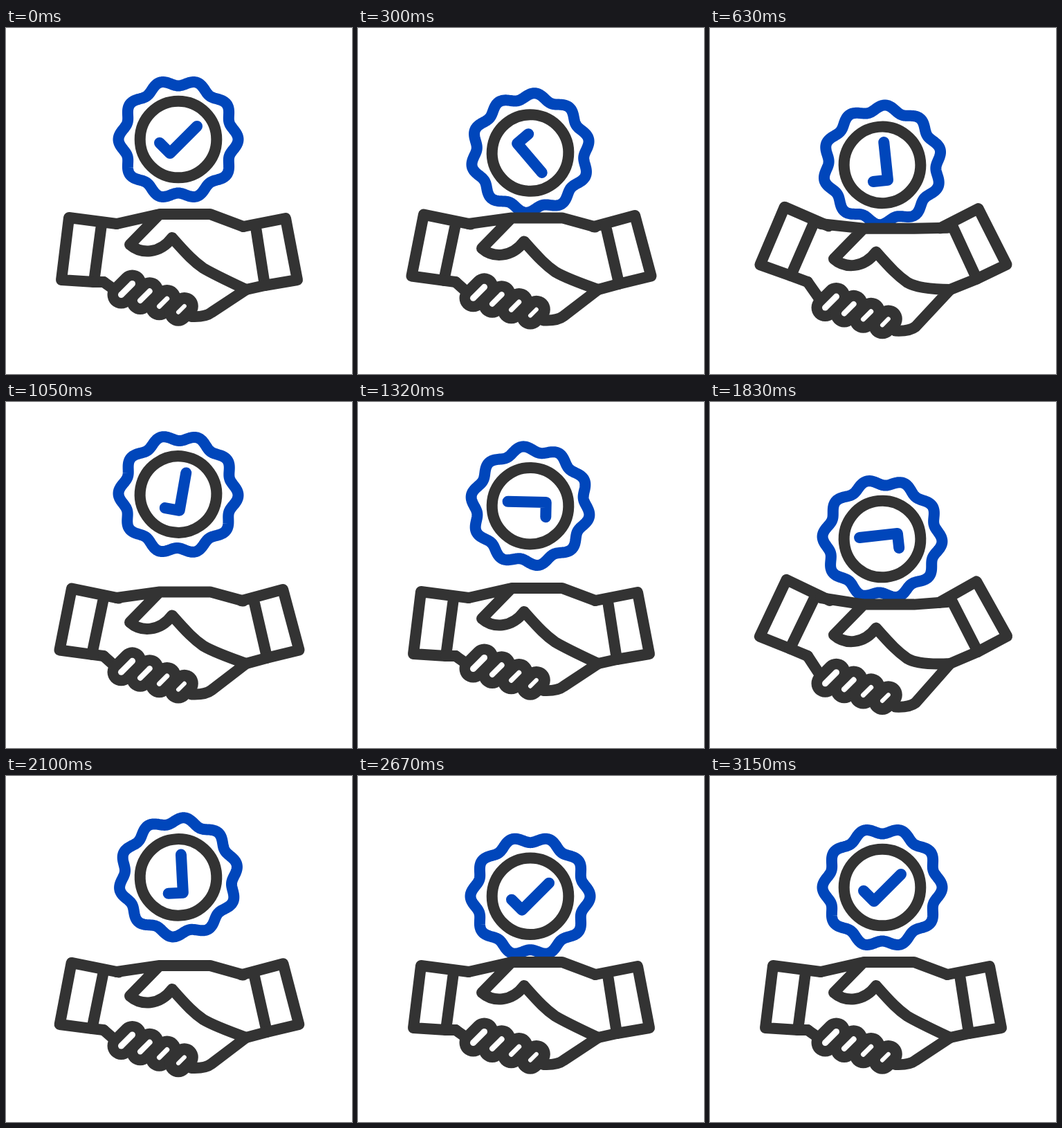
Animation, 500 px wide and 500 px high, one loop 3600 ms. Source, as an HTML page with a canvas:

```html
<!DOCTYPE html>
<html>
<head>
<meta charset="utf-8">
<style>
html, body { margin: 0; width: 100%; height: 100%; overflow: hidden; background: #fff; }
canvas { display: block; width: 500px; height: 500px; }
</style>
</head>
<body>
<canvas id="stage" width="500" height="500"></canvas>
<script>
const ctx = document.getElementById('stage').getContext('2d');
const LOOP = 3600, STEP = 30, DARK = '#333', BLUE = '#0046bb', DEG = Math.PI / 180;

// Turning points of the bouncing badge, and its angle along the way: [time, value]
const HEIGHT = [[0, 161], [590, 199], [1110, 131], [1740, 205], [2178, 141], [2700, 174], [3150, 161]];
const SPIN = [[0, 0], [630, 309], [1050, 685], [1560, 1149], [2100, 1392], [2700, 1440]];
// Time of each hit and how long the hands take to recover
const HITS = [[590, 690], [1740, 500]];

const HANDS = `M160 283L222 269L295 269L343 287M141 367L165 384M347 378L297 411Q288 418 268 417
  M222 269L179 313C195 327 222 327 240 303C262 328 272 338 285 347C300 356 330 370 347 378`;
const LEFT_CUFF = new Path2D('M160 283L91 274L80 364L127 367L138 284');
const RIGHT_CUFF = new Path2D('M343 287L404 275L421 364L374 372L361 288');

const badge = new Path2D();
for (let a = 0; a < 360; a++) {
  const r = 82 + 4.5 * Math.cos(10 * a * DEG);
  badge.lineTo(r * Math.cos(a * DEG), r * Math.sin(a * DEG));
}
badge.closePath();
const ring = new Path2D();
ring.arc(0, 0, 55.3, 0, 7);
const tick = new Path2D('M-27 5L-12 20L27 -19');

const clamp = v => Math.min(1, Math.max(0, v));

// Cubic through the keys; slope(i) gives the speed at key i
function curve(keys, t, slope) {
  const last = keys.length - 1;
  if (t >= keys[last][0]) return keys[last][1];
  const i = keys.findIndex(k => k[0] > t);
  const [t0, v0] = keys[i - 1], [t1, v1] = keys[i];
  const d = t1 - t0, s = (t - t0) / d, u = 1 - s;
  return v0 + (v1 - v0) * s * s * (3 - 2 * s) + d * s * u * (slope(i - 1) * u - slope(i) * s);
}

const height = t => curve(HEIGHT, t, () => 0);

const spin = t => curve(SPIN, t, i => {
  const a = SPIN[i - 1], b = SPIN[i + 1];
  return a && b ? (b[1] - a[1]) / (b[0] - a[0]) : 0;
});

// 0 = hands at rest, 1 = pushed down by the badge
function press(t) {
  const contact = time => Math.max(0, (height(time) - 174) / 24);
  const recoil = HITS.map(([hit, rest]) => {
    const s = clamp((t - hit) / rest);
    return t < hit ? 0 : contact(hit) * (1 - s * s * (3 - 2 * s));
  });
  return Math.max(contact(t), ...recoil);
}

// The wrists stay in place while everything between them sinks
function sag(path, q) {
  return new Path2D(path.replace(/([\d.]+) ([\d.]+)/g, (_, x, y) =>
    `${x} ${+y + 20 * q * clamp(Math.min((x - 160) / 6, (347 - x) / 45))}`));
}

function stroke(path, color, width = 16) {
  ctx.strokeStyle = color;
  ctx.lineWidth = width;
  ctx.stroke(path);
}

function turned(x, y, angle, paint) {
  ctx.save();
  ctx.translate(x, y);
  ctx.rotate(angle * DEG);
  paint();
  ctx.restore();
}

function cuff(path, x, y, angle) {
  turned(x, y, angle, () => {
    ctx.translate(-x, -y);
    stroke(path, DARK);
  });
  // Lower edge from the turned cuff to the fixed wrist
  const side = Math.sign(angle || 1);
}

function drawHands(q) {
  const tilt = 15.5 * q;
  cuff(LEFT_CUFF, 154, 326, tilt);
  cuff(RIGHT_CUFF, 346, 326, -tilt);
  const c = Math.cos(tilt * DEG), s = Math.sin(tilt * DEG);
  const hem = (x, y, dx, dy, dir, wrist) =>
    stroke(new Path2D(`M${x + dx * c - dir * dy * s} ${y + dir * dx * s + dy * c}L${wrist}`), DARK);
  hem(154, 326, -27, 41, 1, '141 367');
  hem(346, 326, 28, 46, -1, '347 378');
  stroke(sag(HANDS, q), DARK);

  const slots = [0, 1, 2, 3].map(i => {
    const x = 174.5 + 26.3 * i, y = 377.5 + 9.6 * i, half = 8 - 1.2 * i;
    return sag(`M${x - half} ${y + half}L${x + half} ${y - half}`, q * .9);
  });
  slots.forEach(p => stroke(p, DARK, 40));
  slots.forEach((p, i) => stroke(p, '#fff', 9 - i));
}

function draw(t) {
  ctx.fillStyle = '#fff';
  ctx.fillRect(0, 0, 500, 500);
  ctx.lineCap = ctx.lineJoin = 'round';
  turned(249, height(t), spin(t), () => {
    stroke(badge, BLUE);
    stroke(ring, DARK);
    stroke(tick, BLUE);
  });
  drawHands(press(t));
}

const start = performance.now();
function frame() {
  const t = (performance.now() - start) % LOOP;
  draw(Math.floor(t / STEP) * STEP);
  requestAnimationFrame(frame);
}
frame();
</script>
</body>
</html>
```
